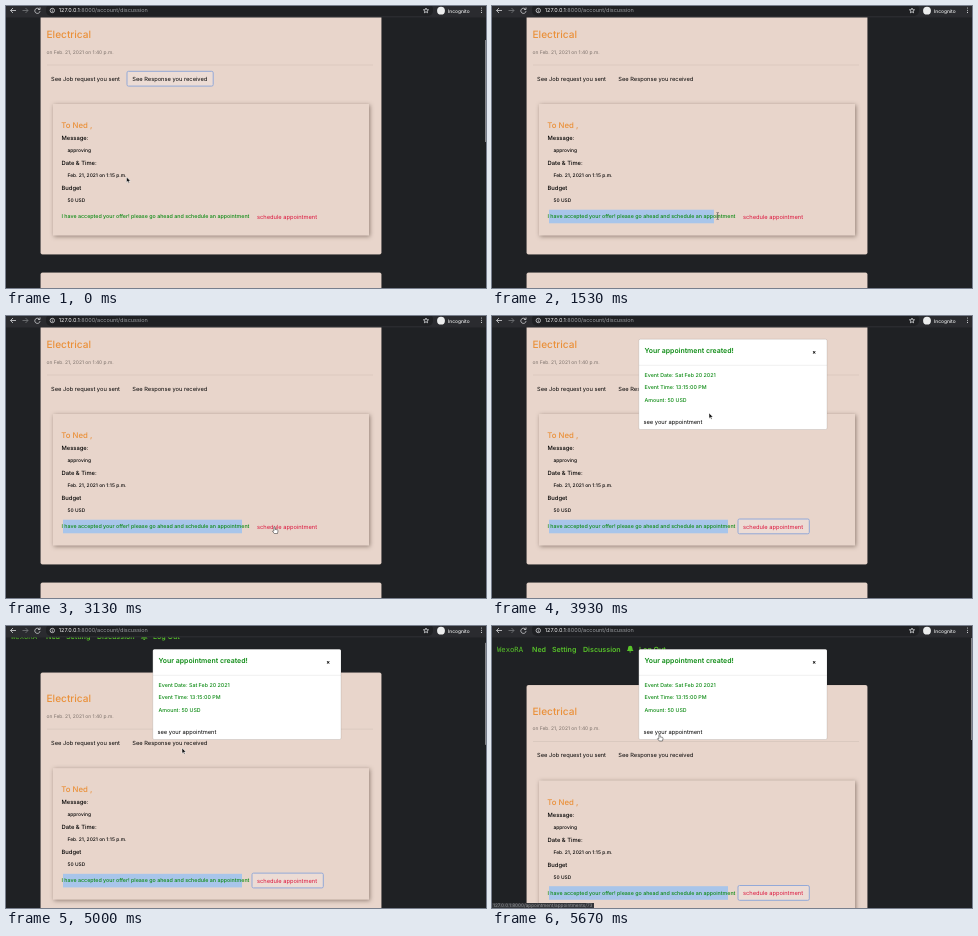
Animation, 480 px wide and 282 px high, one loop 5.74 s. Source, as an HTML page:

```html
<!DOCTYPE html>
<html lang="en">
<head>
<meta charset="utf-8">
<title>Appointment scheduling</title>
<style>
  html, body { margin: 0; width: 100%; height: 100%; overflow: hidden; background: #1f2124; }
  svg { display: block; width: 480px; height: 282px; font-family: Inter, "Open Sans", sans-serif; }
  text { text-rendering: geometricPrecision; font-feature-settings: "calt" 0; white-space: pre; }
  .card { fill: #e8d5cb; }
  .outer { stroke: #000; stroke-opacity: .2; stroke-width: .5; }
  .inner { filter: drop-shadow(1.2px 1.2px 2px rgba(60, 40, 30, .5)); }
  .rule { stroke: #000; stroke-opacity: .1; stroke-width: .6; }
  .title { font-size: 10.1px; font-weight: 500; fill: #ea9039; }
  .name { font-size: 7.8px; font-weight: 500; fill: #ea9039; }
  .body { font-size: 5.73px; }
  .label { font-size: 5.8px; font-weight: 500; }
  .value { font-size: 4.9px; font-weight: 500; }
  .date { font-size: 4.93px; fill: #7b706a; }
  .green { font-size: 5.32px; font-weight: 500; fill: #0b8a12; }
  .heading { font-size: 6.95px; font-weight: 600; fill: #0b8a12; }
  .red { fill: #dc143c; }
  .nav { font-size: 7.1px; font-weight: 600; fill: #58c42a; }
  .brand { font: 7.2px "DejaVu Sans Mono", monospace; fill: #58c42a; }
  .focus { fill: #ecdcd5; stroke: #93a9d8; stroke-width: 1; }
  .icon { fill: none; stroke: #d5d6d8; stroke-width: .8; }
  .pointer { fill: #111; stroke: #fff; stroke-width: .5; stroke-linejoin: round; }
</style>
</head>
<body>
<svg viewBox="0 0 480 282">
  <rect width="480" height="282" fill="#1f2124"/>

  <g id="page">
    <text class="brand" x="5" y="-30.7">WexoRA</text>
    <g class="nav">
      <text x="40" y="-30.7">Ned</text>
      <text x="60" y="-30.7">Setting</text>
      <text x="91" y="-30.7">Discussion</text>
      <path d="M134.8-31.6q1.2-1 1.2-3a2.2 2.2 0 0 1 4.4 0q0 2 1.2 3zM137.2-31h2a1 1 0 0 1-2 0z"/>
      <text x="147" y="-30.7">Log Out</text>
    </g>

    <rect class="card outer" x="34.5" y="2.5" width="341" height="246" rx="2"/>
    <rect class="card outer" x="34.5" y="266.5" width="341" height="100" rx="2"/>
    <text class="title" x="40.5" y="32">Electrical</text>
    <text class="date" x="40.5" y="47.7">on Feb. 21, 2021 on 1:40 p.m.</text>
    <path class="rule" d="M41 59H367"/>
    <rect id="tabFocus" class="focus" x="121" y="65.3" width="86.2" height="14.8" rx="1.5"/>
    <text class="body" x="45" y="74.8">See Job request you sent</text>
    <text class="body" x="126.3" y="74.8">See Response you received</text>

    <rect class="card inner" x="47" y="98" width="316" height="131.5"/>
    <text class="name" x="55.3" y="122">To Ned ,</text>
    <g id="details"></g>
    <rect id="selection" x="57" y="203.7" height="13.6" fill="#a8c5ea"/>
    <text class="green" x="55.5" y="212">I have accepted your offer! please go ahead and schedule an appointment</text>
    <rect id="buttonFocus" class="focus" x="246" y="203" width="71.3" height="14.8" rx="1.5"/>
    <text class="body red" x="251" y="212.8">schedule appointment</text>
  </g>

  <g id="modal">
    <rect x="146.8" y="23.2" width="188.2" height="90.3" rx="1.5" fill="#fff" stroke="#000" stroke-opacity=".2" stroke-width=".5"/>
    <path class="rule" d="M147 49.3H335"/>
    <text class="heading" x="152.5" y="36.8">Your appointment created!</text>
    <text x="320.2" y="38.3" font-size="5.6" font-weight="700">×</text>
    <g id="event"></g>
    <text class="body" x="151.5" y="108.4">see your appointment</text>
  </g>

  <rect id="scrollbar" x="479" width="1" height="102" fill="#85878a"/>

  <g>
    <rect width="480" height="11.5" fill="#2a2b2f"/>
    <rect x="40" y="-2" width="387" height="12" rx="5" fill="#1f2023"/>
    <path class="icon" d="M10 4.5H4.6M7 2L4.5 4.5 7 7"/>
    <path class="icon" style="stroke:#77797c" d="M16.5 4.5H22M19.5 2L22 4.5 19.5 7"/>
    <path class="icon" d="M33.3 3A2.6 2.6 0 1 0 34 5.2M34 1.5V3.5H32"/>
    <circle class="icon" cx="46.3" cy="4.5" r="2.2"/>
    <path class="icon" d="M46.3 4.2V5.9M46.3 2.9V3.5"/>
    <text x="52.8" y="6.4" font-size="5.5" fill="#9a9ca0"><tspan fill="#f0f0f1">127.0.0.1</tspan>:8000/account/discussion</text>
    <path class="icon" d="M420 2l.7 1.7 1.9.1-1.5 1.2.5 1.8-1.6-1-1.6 1 .5-1.8-1.5-1.2 1.9-.1z"/>
    <circle cx="435" cy="4.7" r="3.9" fill="#eceded"/>
    <text x="442" y="6.5" font-size="4.85" font-weight="500" fill="#eceded">Incognito</text>
    <path d="M475.5 2v5.5" stroke="#d5d6d8" stroke-width="1.1" stroke-linecap="round" stroke-dasharray="0 2.2"/>
  </g>

  <g id="status">
    <rect y="277" width="102" height="5" fill="#333539"/>
    <text x="1" y="281.3" font-size="4.7" fill="#989a9e">127.0.0.1:8000/appointment/appointments/73</text>
  </g>

  <g id="cursor">
    <path id="arrow" class="pointer" d="M0 0V5.4L1.3 4.3 2.2 6.2 3.1 5.8 2.3 4H4z"/>
    <path id="beam" d="M-1-3.5Q0-3.5 0-2.8V2.8Q0 3.5-1 3.5M1-3.5Q0-3.5 0-2.8M0 2.8Q0 3.5 1 3.5" fill="none" stroke="#333" stroke-width=".6"/>
    <path id="hand" class="pointer" style="fill:#fff;stroke:#222" d="M-.6 3.6V.4a.6.6 0 0 1 1.2 0V2.4L3 2.9Q3.7 3.1 3.5 4L3 6.5H-.2L-2 4.2q.3-.9 1.4-.1z"/>
  </g>
</svg>

<script>
const LOOP = 5740, FPS = 15, SCROLL = 56.5;
const el = Object.fromEntries([...document.querySelectorAll('[id]')].map(e => [e.id, e]));

const label = (style, x, y, text) => `<text class="${style}" x="${x}" y="${y}">${text}</text>`;
const fields = { 'Message:': 'approving', 'Date &amp; Time:': 'Feb. 21, 2021 on 1:15 p.m.', Budget: '50 USD' };
el.details.innerHTML = Object.entries(fields).map(([key, value], i) =>
  label('label', 55.5, 134 + 25 * i, key) + label('value', 61.5, 146.1 + 25 * i, value)).join('');
el.event.innerHTML = ['Event Date: Sat Feb 20 2021', 'Event Time: 13:15:00 PM', 'Amount: 50 USD']
  .map((line, i) => label('green', 152.5, 60.8 + 12.5 * i, line)).join('');

const ramp = (t, from, to) => Math.min(1, Math.max(0, (t - from) / (to - from)));
const move = (e, x, y) => e.setAttribute('transform', `translate(${x} ${y})`);
const show = (e, opacity) => e.setAttribute('opacity', +opacity);

const DRAG = [1080, 1572];
// Each mouse move: start, end, and the point it reaches.
const moves = [
  [130, 600, 57, 210], [...DRAG, 240, 210], [2430, 2730, 288, 210], [2730, 3070, 268.5, 211],
  [3870, 3930, 217, 97], [4000, 4270, 213, 144], [4470, 4670, 176, 122],
  [5000, 5200, 175, 129], [5250, 5600, 167.5, 108.5]
];

function mouseAt(t) {
  let x = 120.5, y = 171;
  for (const [from, to, toX, toY] of moves) {
    const p = ramp(t, from, to);
    x += (toX - x) * p;
    y += (toY - y) * p;
  }
  return [x, y];
}

function pointerAt(t) {
  if (t < 500) return 'arrow';
  if (t < 2530) return 'beam';
  if (t < 3900) return 'hand';
  return t < 5440 ? 'arrow' : 'hand';
}

// Ease out with a slight overshoot, like a flick to the top of the page.
function scrollAt(t) {
  const q = ramp(t, 4833, 5400) - 1;
  return SCROLL * (1 + 1.9 * q ** 3 + .9 * q ** 2);
}

function draw(t) {
  const y = scrollAt(t);
  move(el.page, 0, y);
  move(el.modal, 0, Math.max(0, y - SCROLL));
  show(el.modal, ramp(t, 3400, 3530));
  show(el.tabFocus, t < 720);
  show(el.buttonFocus, t >= 3260);
  el.selection.setAttribute('width', 179 * ramp(t, ...DRAG));
  el.scrollbar.setAttribute('y', 34 - 22 * Math.min(1, y / SCROLL));
  show(el.scrollbar, 1 - ramp(t, 200, 470) + ramp(t, 4800, 4860));
  show(el.status, t >= 5520);
  move(el.cursor, ...mouseAt(t));
  for (const kind of ['arrow', 'beam', 'hand']) show(el[kind], kind === pointerAt(t));
}

const start = performance.now();
function tick() {
  const t = (performance.now() - start) % LOOP;
  draw(Math.floor((t + 5) * FPS / 1000) * 1000 / FPS);
  requestAnimationFrame(tick);
}
tick();
</script>
</body>
</html>
```
